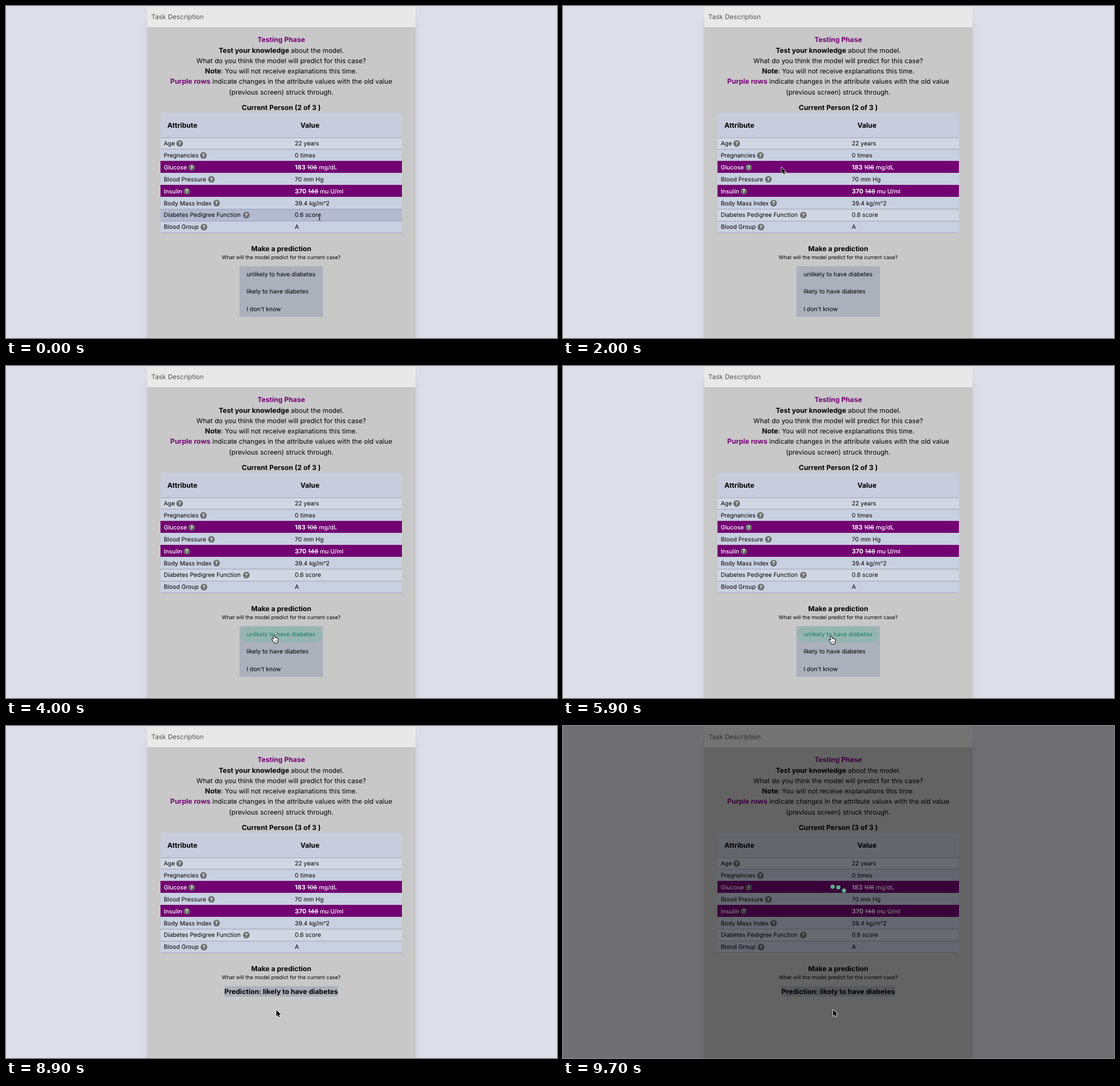
These frames come from a looping animation (963x581 px, 9.8 s). An HTML page with a canvas:

```html
<!DOCTYPE html>
<html lang="en">
<head>
<meta charset="utf-8">
<title>Testing Phase</title>
<style>
  html, body { margin: 0; width: 100%; height: 100%; overflow: hidden; background: #dedee8; }
  canvas { display: block; width: 963px; height: 581px; }
</style>
</head>
<body>
<canvas id="stage" width="963" height="581"></canvas>
<script>
const ctx = document.getElementById('stage').getContext('2d');
const LOOP = 9800, STEP = 100;
const CLICK = 8500, DIM = 9000, HAND_FROM = 3100, SECOND_OPTION = 6600;
const CENTER = 481, ROW_TOP = 230, ROW_H = 20.87;
const PURPLE = '#780078', WHITE = '#fff';
const BODY = 11.6, BOLD = 12.1, ROW = 10.35, ROW_BOLD = 10.75, SMALL = 9.05;

// label, badge x, value: plain text or [new, old, unit]
const rows = [
  ['Age', 303.5, '22 years'],
  ['Pregnancies', 345, '0 times'],
  ['Glucose', 324.5, ['183', '106', 'mg/dL']],
  ['Blood Pressure', 359, '70 mm Hg'],
  ['Insulin', 316, ['370', '148', 'mu U/ml']],
  ['Body Mass Index', 368, '39.4 kg/m^2'],
  ['Diabetes Pedigree Function', 420, '0.6 score'],
  ['Blood Group', 346, 'A']
];
const options = ['unlikely to have diabetes', 'likely to have diabetes', "I don't know"];

// time, x, y of the pointer's hot spot
const path = [
  [0, 548, 370], [100, 548, 370], [900, 331, 241], [1300, 329.5, 240.5],
  [2600, 426.5, 317.5], [3100, 466, 469], [4000, 467.5, 472], [5400, 467.5, 472],
  [6000, 468, 474], [6400, 468, 474], [6800, 469, 495], [8400, 469, 495],
  [8700, 472.5, 497], [9100, 472.5, 497], [9400, 472, 496.5], [LOOP, 472, 496.5]
];

function pointerAt(t) {
  const i = Math.max(1, path.findIndex(p => p[0] > t));
  const [t0, x0, y0] = path[i - 1], [t1, x1, y1] = path[i];
  const k = (t - t0) / (t1 - t0);
  return [x0 + (x1 - x0) * k, y0 + (y1 - y0) * k];
}

function rect(x, y, w, h, color) {
  ctx.fillStyle = color;
  ctx.fillRect(x, y, w, h);
}

function circle(x, y, r, color) {
  ctx.fillStyle = color;
  ctx.beginPath();
  ctx.arc(x, y, r, 0, Math.PI * 2);
  ctx.fill();
}

function setFont(size, weight = 400) {
  ctx.font = `${weight} ${size}px Inter, sans-serif`;
}

function text(str, x, y, size, weight = 400, color = '#000', align = 'left') {
  setFont(size, weight);
  ctx.fillStyle = color;
  ctx.textAlign = align;
  ctx.fillText(str, x, y);
  return ctx.measureText(str).width;
}

const title = (str, y, color = '#000') => text(str, CENTER, y, BOLD, 700, color, 'center');
const centered = (str, y, size = BODY) => text(str, CENTER, y, size, 400, '#000', 'center');

// A bold lead followed by regular text, centred together.
function leadLine(lead, rest, y, color = '#000') {
  setFont(BOLD, 700);
  const w = ctx.measureText(lead).width;
  setFont(BODY);
  const x = CENTER - (w + ctx.measureText(rest).width) / 2;
  text(lead, x, y, BOLD, 700, color);
  text(rest, x + w, y, BODY);
}

const isChanged = row => Array.isArray(row?.[2]);
const activeOption = t => t < HAND_FROM ? -1 : t < SECOND_OPTION ? 0 : 1;

// The highlight trails the pointer by one step.
function hoveredRow(t) {
  if (t >= HAND_FROM) return -1;
  const y = pointerAt(Math.max(0, t - STEP))[1];
  return Math.floor((y - ROW_TOP) / ROW_H);
}

function drawPanel() {
  rect(0, 0, 963, 581, '#dedee8');
  ctx.save();
  ctx.shadowColor = 'rgba(0,0,40,.09)';
  ctx.shadowBlur = 11;
  ctx.shadowOffsetY = 6;
  rect(246.5, 20, 469.5, 600, '#c8c8c8');
  ctx.restore();
  ctx.save();
  ctx.shadowColor = 'rgba(0,0,0,.1)';
  ctx.shadowBlur = 3;
  rect(246.5, 1, 469.5, 36.5, '#e8e8e8');
  ctx.restore();
  text('Task Description', 254, 22.8, BODY, 400, '#555');
}

function drawTable(t) {
  const hover = hoveredRow(t);
  ctx.save();
  ctx.beginPath();
  ctx.roundRect(270, 187, 422, 210.4, 3);
  ctx.clip();
  rect(270, 187, 422, 43, '#c9ccdc');
  rows.forEach((row, i) => {
    const top = Math.floor(ROW_TOP + i * ROW_H);
    const base = i % 2 ? '#c9d0e0' : '#d1d6e2';
    rect(270, top, 422, 22, isChanged(row) ? '#720072' : i === hover ? '#b3b9cf' : base);
    if (!isChanged(row) && !isChanged(rows[i - 1])) rect(270, top, 422, 0.8, '#9499b2');
  });
  rect(270, 396.5, 422, 0.8, '#9499b2');
  ctx.restore();
  text('Attribute', 282, 212.8, BOLD, 700);
  text('Value', 514.5, 212.8, BOLD, 700);
  rows.forEach(drawRow);
}

function drawRow(row, i) {
  const [label, badgeX, value] = row;
  const y = 240.5 + i * ROW_H, base = y + 3.7;
  const changed = isChanged(row);
  text(label, 275.7, base, ROW, changed ? 500 : 400, changed ? WHITE : '#000');
  circle(badgeX, y + 0.2, 5.8, '#6c6c6c');
  text('?', badgeX, y + 3.4, 8.8, 700, WHITE, 'center');
  if (!changed) {
    text(value, 504.8, base, ROW);
    return;
  }
  const [now, old, unit] = value;
  const gap = 3;
  const x = 504.8 + text(now, 504.8, base, ROW_BOLD, 700, WHITE) + gap;
  const w = text(old, x, base, ROW, 500, WHITE);
  rect(x - 0.3, y + 0.1, w + 0.6, 0.9, WHITE);
  text(unit, x + w + gap, base, ROW, 500, WHITE);
}

function drawIntro(t) {
  title('Testing Phase', 63.2, PURPLE);
  leadLine('Test your knowledge', ' about the model.', 81.5);
  centered('What do you think the model will predict for this case?', 99.8);
  leadLine('Note', ': You will not receive explanations this time.', 118.1);
  leadLine('Purple rows', ' indicate changes in the attribute values with the old value', 136.4, PURPLE);
  centered('(previous screen) struck through.', 154.7);
  title(`Current Person (${t >= CLICK ? 3 : 2} of 3 )`, 182.2);
}

function drawPrediction(t) {
  title('Make a prediction', 429.2);
  centered('What will the model predict for the current case?', 443.1, SMALL);
  if (t >= CLICK) {
    rect(381.5, 455.5, 199, 18, '#abb0bb');
    title('Prediction: likely to have diabetes', 468.8);
    return;
  }
  rect(408, 455.5, 146, 88.5, '#abb0bb');
  const active = activeOption(t);
  options.forEach((option, i) => {
    const y = 455.5 + i * 30.5;
    if (i === active) {
      ctx.fillStyle = '#96b5b1';
      ctx.beginPath();
      ctx.roundRect(408.5, y, 145, 28, 14);
      ctx.fill();
    }
    text(option, 420.4, y + 17.2, ROW, 400, i === active ? '#18805f' : '#000');
  });
}

function drawLoader(t) {
  rect(0, 0, 963, 581, 'rgba(0,0,0,.5)');
  for (let i = 0; i < 3; i++) {
    const angle = (t - 9700) / 700 * Math.PI * 2 - 0.6 + i * 1.6;
    circle(471.2 + i * 10, 284.5 - 4 * Math.cos(angle), 3.7, '#5cb088');
  }
}

const shapes = {
  arrow: new Path2D('M0 0V11.2L2.6 8.8L4.2 12.6L6.1 11.8L4.5 8.1H8Z'),
  hand: new Path2D('M2.6 .9C2.6-.3 4.4-.3 4.5.9L5 4C5.4 3.3 6.6 3.4 6.8 4.3C7.3 3.7 8.4 3.9 8.6 4.8' +
    'C9.3 4.3 10.2 4.8 10.2 5.7V8.3C10.2 10 9.2 10.6 9.2 12.6H4.2C4 11 2.5 10 1.7 8.7L.1 6.6' +
    'C-.5 5.6.8 4.9 1.6 5.6L3.2 7Z'),
  knuckles: new Path2D('M5.3 8V10.6M6.8 8V10.6M8.3 8V10.6'),
  beam: new Path2D('M-2.4-5.6Q0-5.6 0-4V4Q0 5.6-2.4 5.6M2.4-5.6Q0-5.6 0-4M0 4Q0 5.6 2.4 5.6M-1.3 1.8H1.3')
};

function stroke(shape, width, color) {
  ctx.lineWidth = width;
  ctx.strokeStyle = color;
  ctx.stroke(shape);
}

function fill(shape, color) {
  ctx.fillStyle = color;
  ctx.fill(shape);
}

function drawPointer(t) {
  const [x, y] = pointerAt(t);
  ctx.save();
  ctx.translate(x, y);
  ctx.lineJoin = 'round';
  if (t < 200) {
    stroke(shapes.beam, 2, 'rgba(255,255,255,.6)');
    stroke(shapes.beam, 1, '#111');
  } else if (t >= HAND_FROM && t < CLICK) {
    ctx.translate(-2.5, 0);
    stroke(shapes.hand, 1.9, '#000');
    fill(shapes.hand, '#fff');
    stroke(shapes.knuckles, 0.6, '#222');
  } else {
    stroke(shapes.arrow, 1.5, '#fff');
    fill(shapes.arrow, '#000');
  }
  ctx.restore();
}

function frame(now) {
  const t = Math.floor(now % LOOP / STEP) * STEP;
  ctx.textRendering = 'geometricPrecision';
  drawPanel();
  drawIntro(t);
  drawTable(t);
  drawPrediction(t);
  if (t >= DIM) drawLoader(t);
  drawPointer(t);
  requestAnimationFrame(frame);
}
requestAnimationFrame(frame);
</script>
</body>
</html>
```
